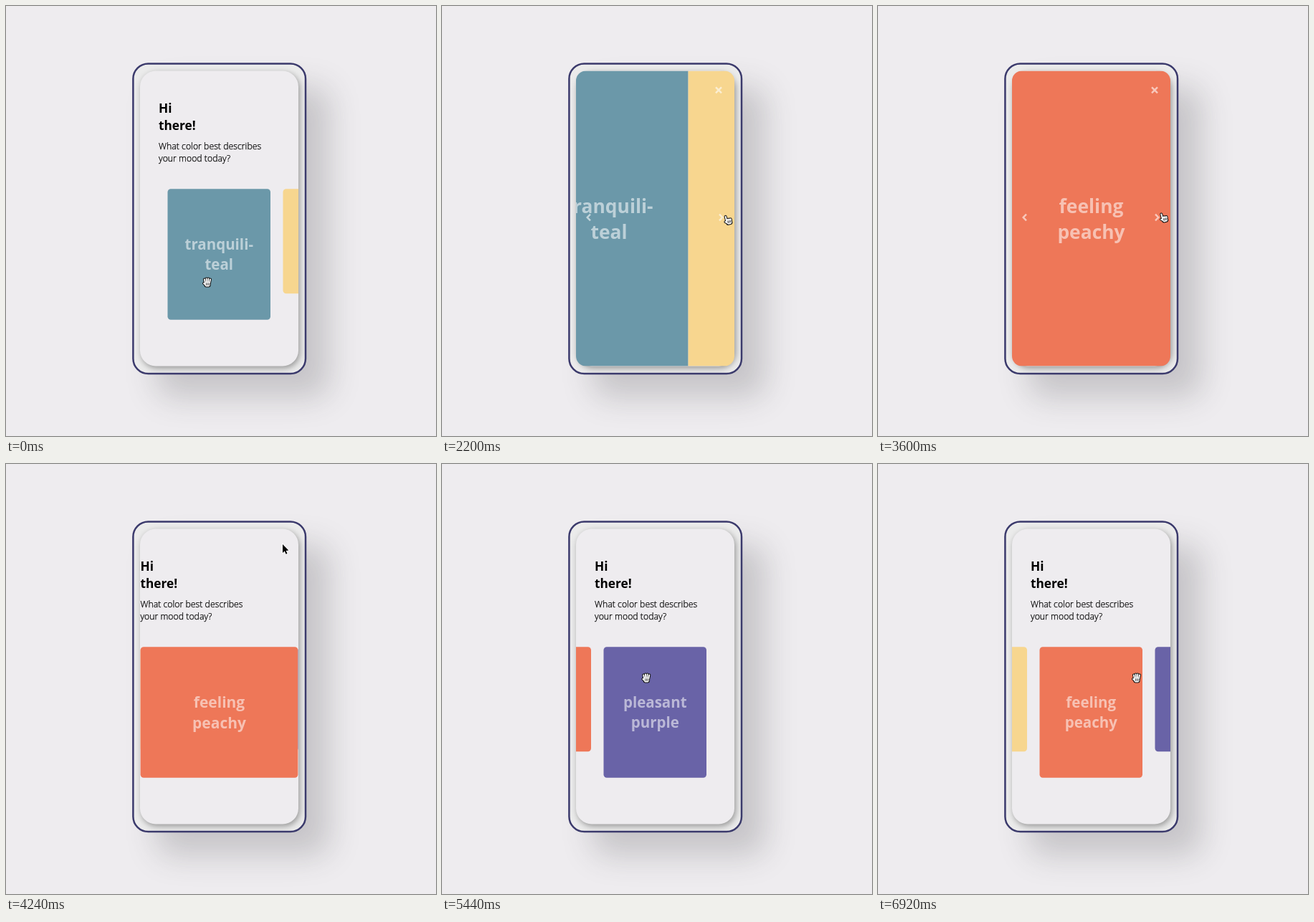
Animation of 600 by 600 pixels, one loop 7280 ms. Source, as an HTML page with a canvas:

```html
<!DOCTYPE html>
<html lang="en">
<head>
<meta charset="utf-8">
<title>Mood colors</title>
<style>
  html, body { margin: 0; width: 100%; height: 100%; overflow: hidden; background: #eeecef; }
  canvas { display: block; width: 600px; height: 600px; }
</style>
</head>
<body>
<canvas id="stage" width="600" height="600"></canvas>
<script>
const LOOP = 7280;
const BG = '#eeecef';
const FONT = '"Open Sans", "Noto Sans", sans-serif';
const SCREEN = { x: 187, y: 90.5, w: 221, h: 412, r: 22 };
const CARD = { x: 225.5, y: 255.3, w: 143.5, h: 182.4, gap: 17.5 };
const CLOSE = { x: 386, y: 117.3 };
const PREV = { x: 204.5, y: 295 };
const NEXT = { x: 389.5, y: 295 };
const cards = [
  { color: '#6b98a9', lines: ['tranquili-', 'teal'] },
  { color: '#f7d68f', lines: ['mellow', 'yellow'] },
  { color: '#ee7758', lines: ['feeling', 'peachy'] },
  { color: '#6963a7', lines: ['pleasant', 'purple'] }
];
const ctx = document.getElementById('stage').getContext('2d');

const lerp = (a, b, k) => a + (b - a) * k;
const clamp = v => Math.max(0, Math.min(1, v));
const linear = k => k;
const smooth = k => k * k * (3 - 2 * k);

// cubic-bezier(.25, .1, .25, 1)
function ease(k) {
  if (k <= 0 || k >= 1) return k;
  const curve = (s, a, b) => 3 * s * (1 - s) * (1 - s) * a + 3 * s * s * (1 - s) * b + s * s * s;
  let lo = 0, hi = 1;
  for (let i = 0; i < 20; i++) {
    const mid = (lo + hi) / 2;
    if (curve(mid, .25, .25) < k) lo = mid; else hi = mid;
  }
  return curve(lo, .1, 1);
}

const span = (t, from, length, fn = ease) => fn(clamp((t - from) / length));

// Drags: start time, start x, distance, and cards advanced on release
const DRAG = 270, SETTLE = 255, GLIDE = 260;
const drags = [
  { at: 4880, x: 344, dx: -95, step: 1 },
  { at: 5640, x: 330, dx: -70, step: 0 },
  { at: 6400, x: 285, dx: 76, step: -1 }
];

// Places the cursor rests at, with arrival time
const stops = [
  { at: 700, x: 288, y: 352 },
  { at: 2000, x: 400, y: 299 },
  { at: 3840, x: 386, y: 117 },
  { at: 4700, x: 344, y: 297 }
];

function cursorAt(t) {
  const p = { x: 281, y: 386 };
  const glide = (at, x, y) => {
    const k = span(t, at - GLIDE, GLIDE, smooth);
    p.x = lerp(p.x, x, k);
    p.y = lerp(p.y, y, k);
  };
  for (const s of stops) glide(s.at, s.x, s.y);
  for (const d of drags) {
    glide(d.at - 60, d.x, 299);
    p.x += d.dx * span(t, d.at, DRAG, linear);
  }
  return p;
}

// Slide position in cards, and the card that is enlarged
function carousel(t) {
  const clicks = span(t, 2082, 600) + span(t, 2962, 600);
  let slide = clicks, focus = clicks;
  for (const d of drags) {
    const hold = d.step ? 1 : .5;
    const pull = -d.dx * hold / (CARD.w + CARD.gap) * span(t, d.at, DRAG, linear);
    const settle = span(t, d.at + DRAG, SETTLE);
    slide += lerp(pull, d.step, settle);
    focus += d.step * settle;
  }
  return { slide, focus };
}

function rounded(c, x, y, w, h, r) {
  c.beginPath();
  c.roundRect(x, y, w, h, r);
}

function makeBackdrop() {
  const cv = document.createElement('canvas');
  cv.width = cv.height = 600;
  const c = cv.getContext('2d');
  const shadow = (color, dx, dy, blur) => {
    c.shadowColor = color;
    c.shadowOffsetX = dx;
    c.shadowOffsetY = dy;
    c.shadowBlur = blur;
  };
  const device = () => rounded(c, 177.4, 80.5, 240.6, 432.5, 21);
  c.fillStyle = BG;
  c.fillRect(0, 0, 600, 600);
  shadow('rgba(60,58,62,.22)', 33, 33, 44);
  c.fillStyle = '#ebebeb';
  device();
  c.fill();
  shadow('rgba(0,0,0,.36)', 2, 3, 8);
  c.fillStyle = BG;
  rounded(c, SCREEN.x, SCREEN.y, SCREEN.w, SCREEN.h, SCREEN.r);
  c.fill();
  shadow('transparent', 0, 0, 0);
  c.strokeStyle = '#3b3a6c';
  c.lineWidth = 2.5;
  device();
  c.stroke();
  return cv;
}
const backdrop = makeBackdrop();

function drawHeader(x) {
  ctx.textAlign = 'left';
  ctx.fillStyle = ctx.strokeStyle = '#000';
  ctx.lineWidth = .25;
  ctx.font = `700 17.3px ${FONT}`;
  ['Hi', 'there!'].forEach((line, i) => ctx.fillText(line, x, 149.3 + i * 23.5));
  ctx.font = `300 12.3px ${FONT}`;
  ['What color best describes', 'your mood today?'].forEach((line, i) => {
    ctx.fillText(line, x, 199.8 + i * 16.75);
    ctx.strokeText(line, x, 199.8 + i * 16.75);
  });
}

function drawCards({ slide, focus }, wide, tall, grow) {
  const w = lerp(CARD.w, SCREEN.w, wide);
  const pitch = w + lerp(CARD.gap, 0, wide);
  const left = lerp(CARD.x, SCREEN.x, wide);
  const top = lerp(CARD.y, SCREEN.y, tall);
  const size = lerp(20.5, 26.4, grow);
  const gap = size * 1.362;
  ctx.textAlign = 'center';
  cards.forEach((card, i) => {
    const x = left + (i - slide) * pitch;
    const rest = CARD.h * lerp(.8, 1, clamp(1 - Math.abs(i - focus)));
    const h = lerp(rest, SCREEN.h, tall);
    ctx.fillStyle = card.color;
    rounded(ctx, x, top, w, h, lerp(4.5, 0, tall));
    ctx.fill();
    ctx.fillStyle = 'rgba(255,255,255,.55)';
    ctx.font = `700 ${size}px ${FONT}`;
    card.lines.forEach((line, n) =>
      ctx.fillText(line, x + w / 2, top + h / 2 + (n - .5) * gap + size * .388));
  });
}

function drawControls(alpha) {
  ctx.strokeStyle = `rgba(255,255,255,${.6 * alpha})`;
  ctx.lineWidth = 2.4;
  ctx.lineCap = 'butt';
  ctx.lineJoin = 'miter';
  ctx.beginPath();
  for (const s of [-4, 4]) {
    ctx.moveTo(CLOSE.x - s, CLOSE.y - 4);
    ctx.lineTo(CLOSE.x + s, CLOSE.y + 4);
  }
  for (const [p, dir] of [[PREV, 1], [NEXT, -1]]) {
    ctx.moveTo(p.x + dir * 2.5, p.y - 4.3);
    ctx.lineTo(p.x - dir * 1.8, p.y);
    ctx.lineTo(p.x + dir * 2.5, p.y + 4.3);
  }
  ctx.stroke();
}

// Four fingers fan out from a round palm, the thumb sits on the left
function drawHand(look) {
  const reach = i => look === 'open' ? 6.6 - Math.abs(i - 1.5)
    : look === 'grab' ? 3.8
    : i ? 2.4 - i * .3 : 6.6;
  if (look === 'point') ctx.rotate(-.25);
  ctx.lineCap = ctx.lineJoin = 'round';
  for (const [color, width, edge] of [['#111', 3.9, 1], ['#fff', 1.9, 0]]) {
    ctx.strokeStyle = ctx.fillStyle = color;
    ctx.lineWidth = width;
    ctx.beginPath();
    for (let i = 0; i < 4; i++) {
      const x = (i - 1.5) * 2;
      ctx.moveTo(x, .5);
      ctx.lineTo(x * (look === 'open' ? 1.35 : 1), .5 - reach(i));
    }
    ctx.moveTo(-2.5, 3);
    ctx.lineTo(-5, 1);
    ctx.stroke();
    rounded(ctx, -3.6 - edge, -edge, 7.2 + 2 * edge, 5.6 + 2 * edge, 3);
    ctx.fill();
  }
  ctx.strokeStyle = '#222';
  ctx.lineWidth = .8;
  ctx.beginPath();
  for (let x = -1.6; x < 3; x += 1.8) {
    ctx.moveTo(x, .8);
    ctx.lineTo(x, 3.4);
  }
  ctx.stroke();
}

function drawArrow() {
  ctx.translate(0, -5);
  ctx.beginPath();
  ctx.moveTo(0, 0);
  ctx.lineTo(0, 12);
  ctx.lineTo(2.8, 9.6);
  ctx.lineTo(4.6, 13.8);
  ctx.lineTo(6.5, 13);
  ctx.lineTo(4.7, 8.9);
  ctx.lineTo(8.3, 8.6);
  ctx.closePath();
  ctx.strokeStyle = '#fff';
  ctx.lineWidth = 1.6;
  ctx.stroke();
  ctx.fillStyle = '#000';
  ctx.fill();
}

function drawCursor(t, controls) {
  const p = cursorAt(t);
  const over = c => controls && Math.hypot(p.x - c.x, p.y - c.y) < 14;
  const dragging = drags.some(d => t >= d.at && t < d.at + DRAG);
  const look = dragging ? 'grab'
    : over(NEXT) || over(CLOSE) ? 'point'
    : t < 1480 || t > 4560 ? 'open' : 'arrow';
  ctx.save();
  ctx.translate(p.x, p.y);
  if (look === 'arrow') drawArrow(); else drawHand(look);
  ctx.restore();
}

function draw(t) {
  const wide = span(t, 790, 220) - span(t, 4235, 205);
  const tall = span(t, 1010, 490) - span(t, 3880, 370);
  const grow = span(t, 1010, 490) - span(t, 3880, 550);
  const controls = t < 3880 ? span(t, 1400, 120, linear) : 0;

  ctx.drawImage(backdrop, 0, 0);
  ctx.save();
  rounded(ctx, SCREEN.x, SCREEN.y, SCREEN.w, SCREEN.h, lerp(SCREEN.r, 14, tall));
  ctx.clip();
  drawHeader(lerp(213, SCREEN.x, wide));
  drawCards(carousel(t), wide, tall, grow);
  drawControls(controls);
  ctx.restore();
  drawCursor(t, controls);
}

const start = performance.now();
function tick() {
  draw((performance.now() - start) % LOOP);
  requestAnimationFrame(tick);
}
tick();
</script>
</body>
</html>
```
